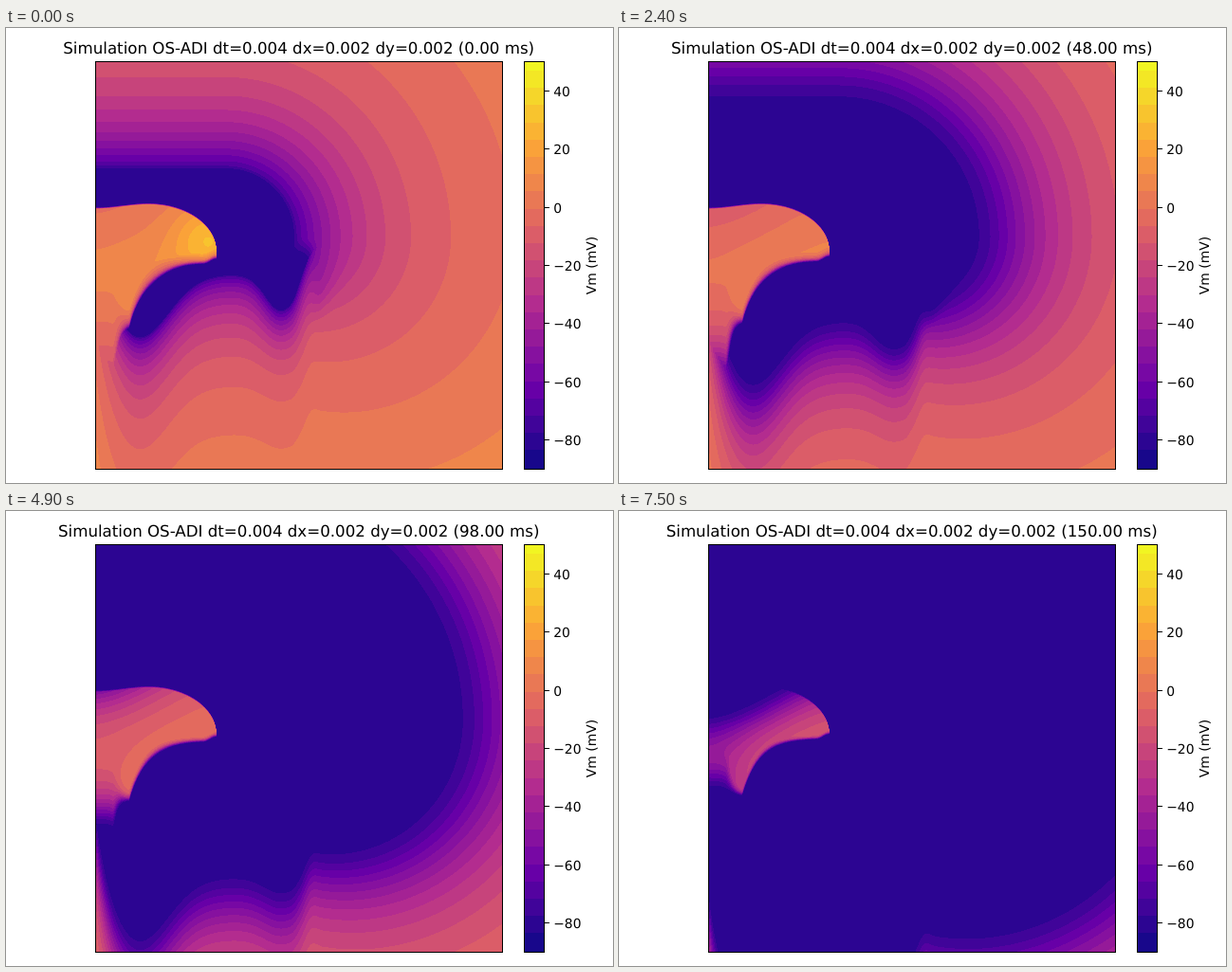
An HTML page with a canvas for the animation above (7600 ms loop, 640x480 px).

```html
<!DOCTYPE html>
<html lang="en">
<head>
<meta charset="utf-8">
<title>Membrane potential simulation</title>
<style>
  html, body { margin: 0; width: 100%; height: 100%; overflow: hidden; background: #fff; }
  canvas { position: absolute; left: 95px; top: 36px; }
  svg { position: absolute; left: 0; top: 0; }
  text { font-family: "DejaVu Sans", sans-serif; font-size: 13.89px; fill: #000; text-rendering: geometricPrecision; }
  #title { font-size: 16.67px; text-anchor: middle; }
  .frame { fill: none; stroke: #000; }
</style>
</head>
<body>
<canvas id="field" width="428" height="429"></canvas>
<svg width="640" height="480" viewBox="0 0 640 480">
  <text id="title" x="308.7" y="27"></text>
  <g id="bar" shape-rendering="crispEdges"></g>
  <rect class="frame" x="94.5" y="35.5" width="429" height="430"/>
  <rect class="frame" x="546.5" y="35.5" width="21" height="430"/>
  <g id="ticks"></g>
  <text transform="translate(622 250.5) rotate(-90)" text-anchor="middle">Vm (mV)</text>
</svg>
<script>
const LEFT = 95, TOP = 36, W = 428, H = 429;
const V_MIN = -90, V_MAX = 50, PX_PER_MV = H / (V_MAX - V_MIN);
const FRAME_MS = 100, FRAMES = 76, STEP = 2;

const clamp = (v, a = 0, b = 1) => Math.min(b, Math.max(a, v));
const mix = (a, b, k) => a + (b - a) * k;
const smooth = (a, b, v) => { const k = clamp((v - a) / (b - a)); return k * k * (3 - 2 * k); };
const smin = (a, b, k) => {
  const h = Math.max(k - Math.abs(a - b), 0) / k;
  return Math.min(a, b) - h * h * k / 4;
};
const bell = (d, width) => Math.exp(-((d / width) ** 2));
const barY = v => TOP + (V_MAX - v) * PX_PER_MV;

// Evenly spaced colour bands, numbered from the top of the bar
const PLASMA = [0x0d0887, 0x6a00a8, 0xb12a90, 0xe16462, 0xfca636, 0xf0f921];
const FIRST_EDGE = 45, BAND = 18.2;

function plasma(k) {
  const p = clamp(k) * 5, i = Math.min(4, Math.floor(p));
  return [16, 8, 0].map(bit =>
    Math.round(mix(PLASMA[i] >> bit & 255, PLASMA[i + 1] >> bit & 255, p - i)));
}
const bands = [];
for (let y0 = TOP, y1 = FIRST_EDGE; y0 < TOP + H; y0 = y1, y1 += BAND) {
  const end = Math.min(y1, TOP + H);
  bands.push({ y0, y1: end, rgb: plasma(1 - ((y0 + end) / 2 - TOP) / H) });
}
const LUT_SCALE = 10;
const colours = Uint32Array.from({ length: (V_MAX - V_MIN) * LUT_SCALE + 1 }, (_, i) => {
  const y = barY(V_MIN + i / LUT_SCALE);
  const [r, g, b] = (bands.find(s => y < s.y1) || bands[bands.length - 1]).rgb;
  return (255 << 24 | b << 16 | g << 8 | r) >>> 0;
});

// Voltage as a function of the time left until repolarisation
const REST = -80, LUT_STEPS = 4;
const profile = Float32Array.from({ length: 300 * LUT_STEPS + 1 }, (_, i) => {
  const s = i / LUT_STEPS;
  return -17.5 + 0.14 * s - 60 * Math.exp(-((s / 36) ** 1.35));
});
const voltage = s => s <= 0 ? REST : profile[Math.min(profile.length - 1, Math.round(s * LUT_STEPS))];

// Time at which a wave that starts slowly reaches a distance
const arrival = (dist, start, speed) =>
  dist <= start ? -10 : Math.sqrt(dist * dist - start * start) / speed;

// Round wave back above and to the right, flattened towards the lower right
const CX = 232, CY = 220;
function roundTime(x, y) {
  const dx = Math.max(0, x - CX), dy = y - CY, r = Math.hypot(dx, dy);
  const lag = dy > 0 ? 180 * (1 - dx / r) * smooth(110, 140, r) : 0;
  return arrival(r + lag - 44, 28, 2.08);
}

// Wavy wave back below: a broad lobe on the left, a narrow one on the right
function wavyTime(x, y) {
  const left = 70 * bell(x - 138, 46) - 90 * Math.exp((LEFT - x) / 14);
  const right = (15 + 23 * bell(y - 300, 55)) * bell(x - 290, 25) - 30 * smooth(300, 328, x);
  return arrival(y - left - right - 225, 35, 1.62);
}

function outerTime(x, y) {
  if (y <= CY) return roundTime(x, y);
  const k = x < CX ? 1 : smooth(CY, 250, y) * (1 - smooth(312, 334, x));
  return k === 1 ? wavyTime(x, y) : mix(roundTime(x, y), wavyTime(x, y), k);
}

// Excited island with a blocked, sharp upper front
const TIP = 222;
function frontY(x) {
  if (x < 150) return 185.5 + 4.5 * (1 - smooth(LEFT, 150, x));
  return 235.5 - 50 * Math.sqrt(1 - Math.min(1, (x - 150) / (TIP - 150)) ** 2);
}

function islandTime(x, y) {
  const upper = 220 - 57 * smooth(85, 245, x);
  const lower = Math.min(290 + 10 * smooth(105, 130, x), 240 + 60 * Math.exp((130 - x) / 18))
    - 5 * smooth(208, TIP, x);
  const steep = 1.3 + 9 * smooth(112, 135, x) + 8 * smooth(150, 200, x);
  const core = 182 + 43 * smooth(LEFT, 190, x);
  const edge = smin(150 + (y - upper) * 1.1, 150 + (lower - y) * steep, 30);
  return smin(edge, core, 30);
}

const outer = new Float32Array(W * H);
const inner = new Float32Array(W * H);
const mask = new Float32Array(W * H);
const glow = new Float32Array(W * H);

function prepare() {
  for (let p = 0; p < W * H; p++) {
    const x = LEFT + p % W + 0.5, y = TOP + Math.floor(p / W) + 0.5;
    outer[p] = outerTime(x, y);
    if (x > TIP) continue;
    const own = islandTime(x, y);
    inner[p] = Math.max(outer[p], own);
    mask[p] = clamp((y - frontY(x)) / 1.6 + 0.5);
    glow[p] = 18 * smooth(0, 90, own) * bell(Math.hypot(x - 212, y - 222), 34);
  }
}

const ctx = document.getElementById("field").getContext("2d");
const image = ctx.createImageData(W, H);
const pixels = new Uint32Array(image.data.buffer);
const title = document.getElementById("title");

function draw(ms) {
  const heat = Math.exp(-ms / 9);
  for (let p = 0; p < pixels.length; p++) {
    let v = voltage(outer[p] - ms);
    if (mask[p] > 0) v = mix(v, voltage(inner[p] - ms) + glow[p] * heat, mask[p]);
    pixels[p] = colours[Math.round((clamp(v, V_MIN, V_MAX) - V_MIN) * LUT_SCALE)];
  }
  ctx.putImageData(image, 0, 0);
  title.textContent = `Simulation OS-ADI dt=0.004 dx=0.002 dy=0.002 (${ms.toFixed(2)} ms)`;
}

function drawBar() {
  document.getElementById("bar").innerHTML = bands.map(({ y0, y1, rgb }) =>
    `<rect x="547" y="${y0}" width="20" height="${y1 - y0}" fill="rgb(${rgb})"/>`).join("");
  let marks = "";
  for (let v = -80; v <= 40; v += 20) {
    const y = Math.floor(barY(v));
    marks += `<path d="M568 ${y + 0.5}h5" stroke="#000"/>`
      + `<text x="577.2" y="${y + 6}">${String(v).replace("-", "\u2212")}</text>`;
  }
  document.getElementById("ticks").innerHTML = marks;
}

prepare();
drawBar();
draw(0);
const start = performance.now();
let shown = 0;
function tick() {
  const frame = Math.floor(Math.max(0, performance.now() - start) / FRAME_MS) % FRAMES;
  if (frame !== shown) draw((shown = frame) * STEP);
  requestAnimationFrame(tick);
}
requestAnimationFrame(tick);
</script>
</body>
</html>
```
